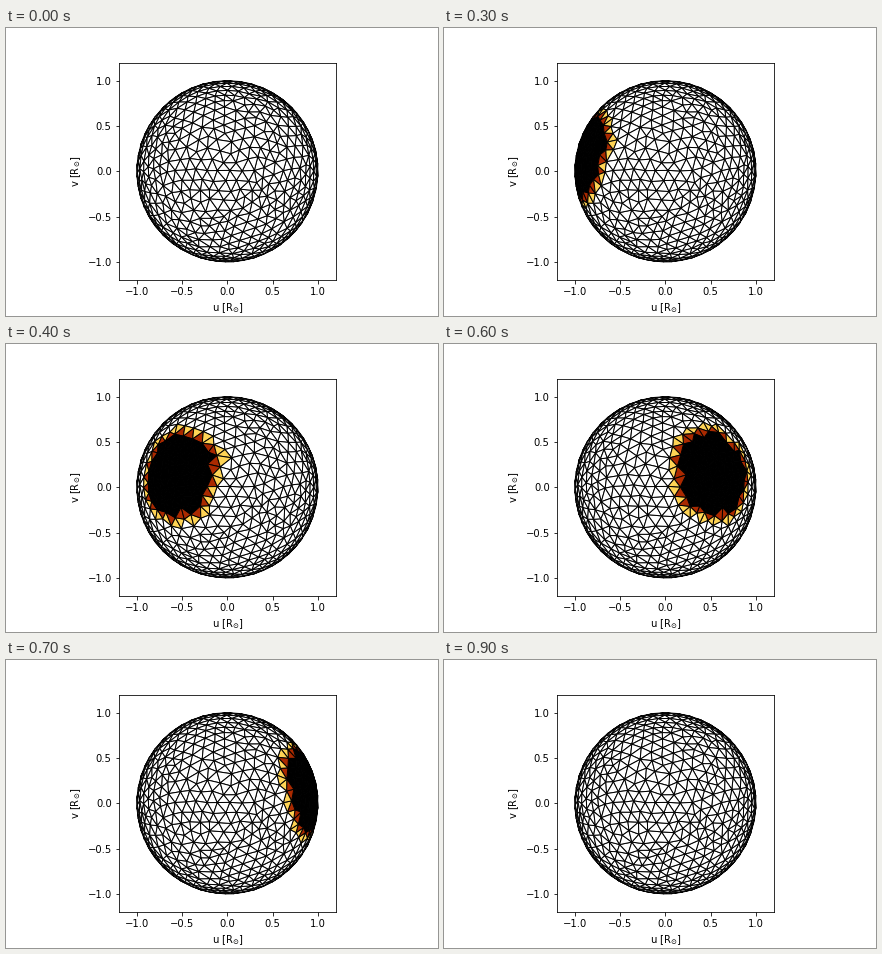
A matplotlib script that plays this animation: 432x288 px, repeating every 1100 ms.

```python
import numpy as np
import matplotlib.pyplot as plt
from matplotlib.animation import FuncAnimation
from matplotlib.collections import PolyCollection

STEPS = 11
DARK_STEP = 2
DARK_LEVEL = 0.3
TRIANGLES = 1500
SPOT_COLAT = np.radians(80)
SPOT_RADIUS = np.radians(30)


def unit(v):
    return v / np.linalg.norm(v)


def front_angles(p):
    """Outer angle at each point of the front, seen in its tangent plane."""
    a = np.roll(p, 1, axis=0) - p
    b = np.roll(p, -1, axis=0) - p
    dot = lambda s, t: np.sum(s * t, axis=1)
    sine = dot(p, np.cross(a, b))
    cosine = dot(a, b) - dot(a, p) * dot(b, p)
    return np.arctan2(sine, cosine) % (2 * np.pi)


def split_count(omega, mid, before, after, delta):
    """Number of triangles that fill the angle at a front point."""
    gap = lambda s, t: np.linalg.norm(s - t)
    count = int(omega * 3 / np.pi) + 1
    if omega / count < 0.8 and count > 1:
        count -= 1
    if count == 1 and omega > 0.8 and gap(before, after) > 1.2 * delta:
        count = 2
    if omega < 3 and min(gap(before, mid), gap(after, mid)) <= 0.5 * delta:
        count = 1
    return count


def march_sphere(total):
    """Triangulate the unit sphere by marching from its north pole."""
    delta = np.sqrt(4 / np.sqrt(3) * 4 * np.pi / total)
    points = [np.array([0.0, 0.0, 1.0])]
    for k in range(6):
        a = k * np.pi / 3
        points.append(unit(np.array([-delta * np.cos(a), -delta * np.sin(a), 1])))
    front = list(range(1, 7))
    tris = [(0, k, k % 6 + 1) for k in front]

    while len(front) > 3 and len(tris) < 1.3 * total:
        angles = front_angles(np.array([points[i] for i in front]))
        m = int(np.argmin(np.round(angles, 9)))
        mid, before, after = front[m], front[m - 1], front[(m + 1) % len(front)]
        p, q = points[mid], points[before]
        count = split_count(angles[m], p, q, points[after], delta)

        # Swing the edge to the previous point through the open angle.
        e1 = unit((q - p) - np.dot(q - p, p) * p)
        e2 = np.cross(p, e1)
        fresh = []
        for k in range(1, count):
            a = k * angles[m] / count
            fresh.append(len(points))
            points.append(unit(p + delta * (np.cos(a) * e1 + np.sin(a) * e2)))

        chain = [before] + fresh + [after]
        tris += [(s, t, mid) for s, t in zip(chain, chain[1:])]
        front[m:m + 1] = fresh
    if len(front) == 3:
        tris.append(tuple(front))
    return np.array(points), np.array(tris)


xyz, tris = march_sphere(TRIANGLES)
uvw = xyz[:, [0, 2, 1]]

# Only faces turned to the viewer, nearest last.
depth = uvw[tris, 2].mean(axis=1)
order = np.argsort(depth)
tris = tris[order[depth[order] > 0]]
heat = plt.get_cmap("afmhot")


def face_colors(step):
    lon = 2 * np.pi * step / (STEPS - 1) - np.pi
    spot = np.array([np.sin(SPOT_COLAT) * np.sin(lon),
                     np.cos(SPOT_COLAT),
                     np.sin(SPOT_COLAT) * np.cos(lon)])
    outside = uvw @ spot < np.cos(SPOT_RADIUS)
    return heat(outside[tris].mean(axis=1))


def darken(image, dpi):
    """Clip every colour to a dark grey, so only the darkest strokes stay."""
    image = image.copy()
    image[..., :3] = np.minimum(image[..., :3], DARK_LEVEL)
    return image, 0, 0


plt.rcParams.update({"font.family": "DejaVu Sans", "font.size": 10})
fig, ax = plt.subplots(figsize=(6, 4), dpi=72, facecolor="white")
fig.subplots_adjust(left=0.125, right=0.9, bottom=0.125, top=0.88)
ax.set_aspect("equal")
ax.set(xlim=(-1.2, 1.2), ylim=(-1.2, 1.2))
ticks = np.arange(-1, 1.1, 0.5)
ax.set_xticks(ticks)
ax.set_yticks(ticks)
ax.set_xlabel(r"u [$\mathrm{R_{\odot}}$]")
ax.set_ylabel(r"v [$\mathrm{R_{\odot}}$]")

mesh = PolyCollection(uvw[tris][:, :, :2], facecolors=face_colors(0),
                      edgecolors="black", linewidths=1)
ax.add_collection(mesh)


def update(step):
    mesh.set_facecolor(face_colors(step))
    fig.set_agg_filter(darken if step == DARK_STEP else None)
    return mesh,


anim = FuncAnimation(fig, update, frames=STEPS, interval=100,
                     repeat=True, repeat_delay=0, blit=False)
plt.show()
```
